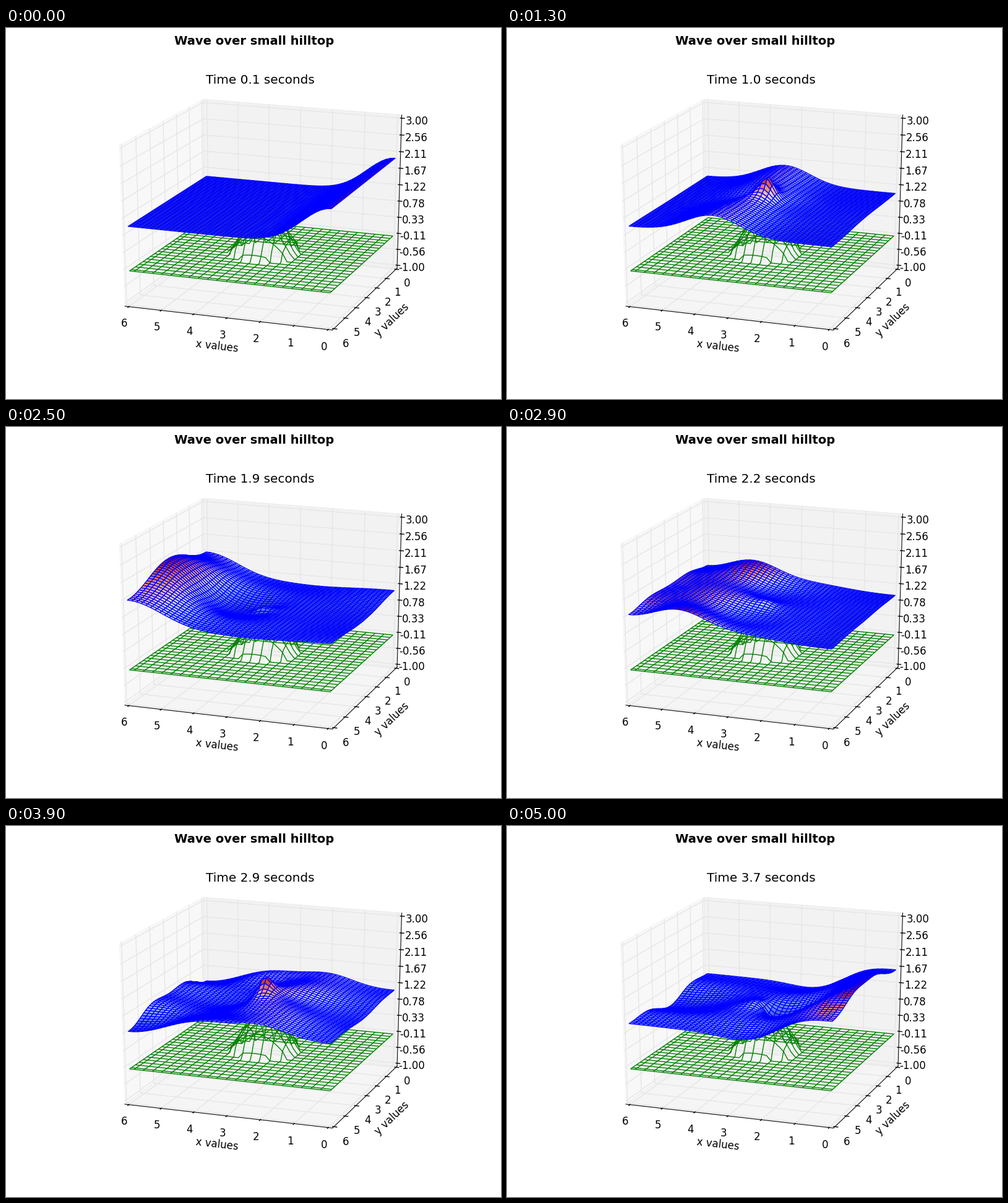
Animation of 800 by 600 pixels, one loop 5.1 s. Source, as a matplotlib script:

```python
import numpy as np
import matplotlib.pyplot as plt
from matplotlib.animation import FuncAnimation
from matplotlib.collections import LineCollection, PolyCollection

plt.rcParams["font.family"] = "DejaVu Sans"

FRAMES, INTERVAL = 51, 100
FRAME_TIME, SUBSTEPS = 0.073, 3      # simulated seconds per frame
SIZE, N = 6.0, 44                    # square domain, grid points per side
GRAVITY, DEPTH, HILL = 10.0, 1.165, 1.08

# ---------- camera ----------
ELEV, AZIM, DIST = np.radians(20), np.radians(110), 10.0
SIN_E, COS_E = np.sin(ELEV), np.cos(ELEV)
SIN_A, COS_A = np.sin(AZIM), np.cos(AZIM)
LOW = np.array([0.0, 0.0, -1.0])
SPAN = np.array([SIZE, SIZE, 4.0])


def project(points):
    """Map (..., 3) data points to stage pixels and depth towards the eye."""
    d = (np.asarray(points, float) - LOW) / SPAN - 0.5
    x, y, z = d[..., 0], d[..., 1], d[..., 2]
    ground = COS_A * x + SIN_A * y
    near = COS_E * ground + SIN_E * z
    right = (COS_A * y - SIN_A * x) / (DIST - near)
    up = (COS_E * z - SIN_E * ground) / (DIST - near)
    px = 100 + (right + 0.095) / 0.185 * 620
    py = 540 - (up + 0.095) / 0.185 * 480
    return np.stack([px, py], axis=-1), near


# ---------- wave model ----------
axis = np.linspace(0, SIZE, N)
X, Y = np.meshgrid(axis, axis)
STEP = axis[1]
DT = FRAME_TIME / SUBSTEPS

dx, dy = X - SIZE / 2, Y - SIZE / 2
hat = np.where(np.hypot(dx, dy) <= 1,
               HILL * np.cos(np.pi * dx / 2) * np.cos(np.pi * dy / 2), 0)
speed2 = np.pad(GRAVITY * (DEPTH - hat), 1, "reflect")
kx = (speed2[1:-1, 1:] + speed2[1:-1, :-1]) / 2
ky = (speed2[1:, 1:-1] + speed2[:-1, 1:-1]) / 2


def acceleration(u):
    p = np.pad(u, 1, "reflect")
    fx = kx * np.diff(p[1:-1], axis=1)
    fy = ky * np.diff(p[:, 1:-1], axis=0)
    return (np.diff(fx, axis=1) + np.diff(fy, axis=0)) / STEP**2


def simulate():
    u = np.exp(-X**2 / 1.28)
    prev = u + 0.5 * DT**2 * acceleration(u)
    states = []
    for _ in range(FRAMES):
        for _ in range(SUBSTEPS):
            u, prev = 2 * u - prev + DT**2 * acceleration(u), u
        states.append(1 + u)
    return states


states = simulate()

# ---------- stage ----------
fig = plt.figure(figsize=(8, 6), dpi=100, facecolor="white")
ax = fig.add_axes([0, 0, 1, 1])
ax.set_xlim(0, 800)
ax.set_ylim(600, 0)
ax.axis("off")

ax.text(400.6, 12, "Wave over small hilltop", size=14, weight="bold",
        ha="center", va="top")
clock = ax.text(411, 90.5, "", size=14.4, ha="center", va="baseline")

# ---------- box with panes, grids and axes ----------
DELTA = SPAN / 12
LO, HI = LOW - DELTA / 4, LOW + SPAN + DELTA / 4
CENTER = LOW + SPAN / 2
BACK = np.array([HI[0], LO[1], LO[2]])     # corner where the panes meet
FRONT = np.array([LO[0], HI[1], HI[2]])


def pane(fixed, grey):
    a, b = [k for k in range(3) if k != fixed]
    corners = []
    for pa, pb in ((BACK, BACK), (FRONT, BACK), (FRONT, FRONT), (BACK, FRONT)):
        c = BACK.copy()
        c[a], c[b] = pa[a], pb[b]
        corners.append(c)
    ax.add_patch(plt.Polygon(project(corners)[0], facecolor=str(grey),
                             edgecolor=str(grey), alpha=0.5, lw=1, zorder=1))


def pushed_out(point, along, factor):
    out = np.array(point, float)
    for k in range(3):
        if k != along:
            out[k] += np.sign(out[k] - CENTER[k]) * factor * DELTA[k]
    return project(out)[0]


def draw_axis(along, edge, tick_dir, tick_sign, ticks, fmt, label=""):
    ends = np.array([edge, edge], float)
    ends[:, along] = LO[along], HI[along]
    line = project(ends)[0]
    ax.plot(line[:, 0], line[:, 1], color="black", lw=0.75, zorder=3)

    grid, marks = [], []
    for value in ticks:
        bend = BACK.copy()
        bend[along] = value
        path = [bend.copy(), bend, bend.copy()]
        for end, k in ((0, (along + 1) % 3), (2, (along + 2) % 3)):
            path[end][k] = FRONT[k]
        grid.append(project(path)[0])

        pos = np.array(edge, float)
        pos[along] = value
        mark = np.array([pos, pos])
        mark[:, tick_dir] += np.array([0.1, -0.2]) * tick_sign * DELTA[tick_dir]
        marks.append(project(mark)[0])
        tx, ty = pushed_out(pos, along, 0.7)
        ax.text(tx + 0.5, ty - 1.3, fmt % value, size=12,
                ha="center", va="top", zorder=3)

    ax.add_collection(LineCollection(grid, colors="0.9", linewidths=1, zorder=2))
    ax.add_collection(LineCollection(marks, colors="black", linewidths=1, zorder=3))

    if label:
        run, drop = line[1] - line[0]
        angle = (np.degrees(np.arctan2(-drop, run)) + 90) % 180 - 90
        mid = np.array(edge, float)
        mid[along] = CENTER[along]
        lx, ly = pushed_out(mid, along, 1.6)
        ax.text(lx, ly, label, size=12, rotation=angle,
                ha="center", va="center", zorder=3)


for fixed, grey in enumerate((0.95, 0.90, 0.925)):
    pane(fixed, grey)
draw_axis(0, (LO[0], HI[1], LO[2]), 1, -1, range(7), "%d", "x values")
draw_axis(1, (LO[0], LO[1], LO[2]), 0, 1, range(7), "%d", "y values")
draw_axis(2, (LO[0], LO[1], LO[2]), 0, 1, np.linspace(-1, 3, 10), "%.2f")

# ---------- hill wireframe: every second grid line plus the last ----------
hill = project(np.stack([X, Y, hat + 1 - DEPTH], axis=-1))[0]
picked = [*range(0, N, 2), N - 1]
wires = [hill[k] for k in picked] + [hill[:, k] for k in picked]
ax.add_collection(LineCollection(wires, colors="green", linewidths=1, zorder=4))

# ---------- water surface ----------
water = PolyCollection([], cmap="coolwarm", edgecolors="blue",
                       linewidths=1, zorder=5)
ax.add_collection(water, autolim=False)


def cells(grid):
    """Four corners of every grid cell, one row per cell."""
    quad = np.stack([grid[:-1, :-1], grid[:-1, 1:], grid[1:, 1:], grid[1:, :-1]],
                    axis=2)
    return quad.reshape(-1, 4, *grid.shape[2:])


def draw(i):
    z = states[i]
    pixels, near = project(np.stack([X, Y, z], axis=-1))
    order = np.argsort(cells(near).mean(axis=1))     # far cells first
    height = cells(z).mean(axis=1)[order]
    water.set_verts(cells(pixels)[order])
    water.set_array(height)
    water.set_clim(height.min(), height.max())
    clock.set_text(f"Time {FRAME_TIME * (i + 1):.1f} seconds")
    return water, clock


anim = FuncAnimation(fig, draw, frames=FRAMES, interval=INTERVAL,
                     repeat=True, repeat_delay=0, blit=False)
plt.show()
```
